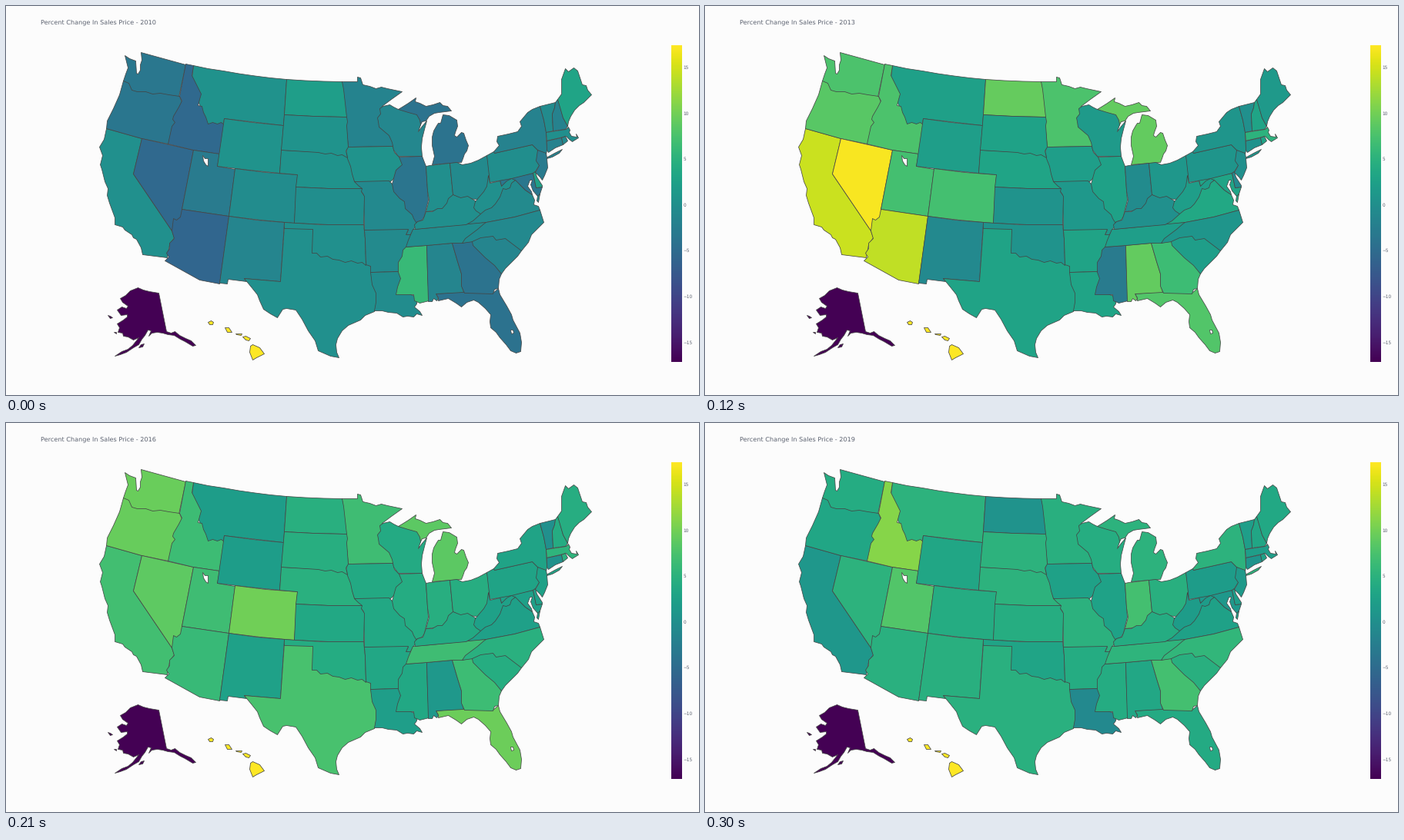
Recreate the animation shown at these times as a matplotlib script. Size 900 px wide and 506 px high, loop 330 ms.

```python
import numpy as np
import matplotlib.pyplot as plt
from matplotlib.animation import FuncAnimation

W, H, DPI = 900, 506, 64
LOW, HIGH = -17.2, 17.3
BAR_TOP, BAR_BOTTOM = 51.5, 463
KNOWN_YEARS = [2010, 2011, 2012, 2013, 2015, 2017, 2019]
PT = 72 / DPI  # points per pixel

plt.rcParams["font.family"] = "DejaVu Sans"
plt.rcParams["text.hinting"] = "none"
viridis = plt.get_cmap("viridis")

fig = plt.figure(figsize=(W / DPI, H / DPI), dpi=DPI, facecolor="#fcfcfc")
ax = fig.add_axes([0, 0, 1, 1])
ax.axis("off")

states = []


def shape(points, color):
    xy = np.reshape(points, (-1, 2))
    return ax.fill(xy[:, 0], xy[:, 1], facecolor=color, edgecolor="#444444",
                   linewidth=0.75 * PT, joinstyle="round")[0]


def state(name, rates, *outlines):
    """Later states cover the rough inner edges of earlier ones."""
    states.append((rates, [shape(o, "white") for o in outlines]))


# West
state("MT", [.3, -2.5, 1, 2.3, 1.2, 2.5, 5],
      [243, 77, 262, 81, 282, 84, 302, 87.5, 323, 90.5, 343, 93, 364, 95,
       360, 155, 283, 146, 281, 156, 262, 156, 240, 100])
state("CA", [0, -6, 0, 14.5, 6.5, 7.3, 1],
      [130, 159, 176, 172, 165, 218, 215, 292, 218, 301, 212, 310, 209, 327,
       177, 323, 175, 314, 169, 303, 165, 301, 163, 297, 154, 291, 151, 287,
       141, 284, 141, 275, 134, 256, 131, 246, 132, 237, 128, 228, 124, 212,
       122, 206, 125, 194, 121, 183, 127, 173])
state("WA", [-3.5, -9, -2.5, 7.5, 7.3, 11.5, 4],
      [154, 64, 160, 68, 168, 71, 169, 87, 171, 88, 174, 83, 174, 76, 176, 70,
       175, 60, 204, 68, 233, 76, 224, 118, 160, 120, 152, 97, 155, 88,
       158, 80, 156, 72])
state("OR", [-3.7, -9.5, -.3, 8.3, 8.5, 10, 3.2],
      [152, 97, 159, 100, 163, 109, 170, 111, 181, 111, 190, 114, 200, 113,
       211, 115, 225, 117, 231, 132, 224, 165, 210, 179, 176, 172, 130, 159,
       131, 149, 139, 133, 147, 115])
state("NV", [-5.5, -12, 0, 17, 8.5, 9, 5],
      [176, 172, 243, 187, 228, 264, 228, 275, 222, 281, 215, 292, 165, 218])
state("ID", [-5.5, -9, -.5, 7.5, 4.8, 8, 11],
      [233, 75, 243, 77, 241, 90, 244, 96, 248, 104, 253, 114, 251, 121,
       249, 129, 254, 130, 256, 138, 259, 144, 262, 153, 268, 151, 274, 153,
       279, 151, 283, 154, 277, 192, 243, 187, 210, 179, 215, 156, 219, 151,
       216, 147, 217, 143, 224, 131, 228, 123, 225, 117])
state("UT", [-3, -7, -1, 7, 5, 8.2, 8],
      [243, 187, 277, 192, 274, 208, 297, 212, 289, 273, 228, 264])
state("AZ", [-6, -11.5, 7, 14, 5, 7.2, 4.7],
      [228, 264, 289, 273, 277, 361, 251, 356, 206, 331, 208, 329, 211, 326,
       208, 321, 212, 315, 212, 308, 218, 302, 215, 292, 217, 276, 221, 278,
       226, 274])
state("WY", [.5, 0, 1, 2, 3.5, .3, 3.2],
      [283, 146, 320, 151, 360, 155, 355, 217, 315, 213, 274, 208])
state("CO", [-.5, -3, 2.5, 7, 11, 8.7, 4],
      [297, 211, 337, 216, 378, 219, 374, 282, 330, 278, 289, 273])
state("NM", [-1.5, -6, -4, -1, 1.5, 3.3, 4.5],
      [289, 273, 325, 278, 361, 281, 356, 358, 309, 354, 312, 358, 288, 355,
       287, 361, 277, 360])

# Middle
state("MN", [-1.8, -8.5, -.5, 7.5, 5, 8.3, 4.5],
      [436, 98, 456, 98, 456, 92, 460, 93, 463, 102, 472, 104, 480, 107,
       487, 105, 495, 107, 514, 111, 500, 121, 488, 130, 494, 145, 504, 170,
       502, 182, 444, 183, 440, 140])
state("ND", [2, 4, 2.5, 9.2, 7.5, 1.7, .5],
      [364, 95, 388, 96.5, 412, 97.5, 436, 98, 438, 108, 440, 126, 442, 144,
       400, 143, 361, 141])
state("IA", [.5, -1.5, .8, 2, 3.2, 4, 2.5],
      [443, 183, 502, 182, 504, 190, 512, 198, 516, 206, 505, 222, 499, 228,
       452, 228, 440, 195])
state("MO", [-1, -4, -1.5, 1.2, 2.7, 4.2, 4.8],
      [452, 228, 497, 227, 506, 236, 525, 262, 534, 282, 524, 298, 519, 297,
       522, 291, 465, 291, 464, 245])
state("NE", [.5, -1.5, .5, 3, 4, 5.3, 5],
      [357, 187, 442, 191, 443, 198, 447, 208, 449, 218, 452, 228, 457, 233,
       462, 237, 420, 237, 376, 235, 378, 219, 355, 217])
state("SD", [.5, 0, -1.5, 2.7, 5, 3.8, 5],
      [361, 141, 400, 143, 442, 144, 443, 150, 442, 155, 444, 183, 441, 188,
       443, 197, 436, 193, 430, 194, 422, 191, 414, 192, 405, 190, 357, 187])
state("KS", [-.3, -3.5, -1.5, .5, 1.5, 5.5, 4.2],
      [376, 235, 420, 237, 462, 237, 461, 241, 465, 247, 464, 284, 420, 284,
       374, 282])
state("TX", [0, -2.2, -.5, 2.8, 6, 8.5, 4.7],
      [361, 287, 398, 289, 410, 310, 460, 325, 473, 338, 480, 360, 484, 385,
       478, 397, 466, 402, 460, 408, 444, 415, 436, 422, 430, 432, 428, 440,
       429, 450, 432, 457, 421, 455, 405, 448, 401, 435, 392, 422, 384, 407,
       376, 395, 364, 393, 359, 394, 352, 405, 343, 400, 334, 394, 329, 383,
       326, 375, 318, 365, 309, 354, 356, 358])
state("OK", [0, -2, -1, .5, 2, 6, 3],
      [361, 281, 410, 284, 464, 284, 466, 303, 467, 337, 462, 333, 456, 334,
       448, 331, 440, 333, 432, 330, 424, 329, 417, 325, 408, 326, 403, 321,
       397, 321, 398, 290, 361, 289])
state("AR", [-.8, -2.5, 0, 2.8, 2.7, 4, 4],
      [465, 291, 522, 290, 519, 297, 525, 297, 526, 310, 520, 325, 512, 336,
       509, 345, 473, 346, 473, 338, 467, 336, 466, 303])
state("LA", [-.5, -2, -2, 3, 2.5, 1.5, -1],
      [473, 346, 509, 345, 516, 356, 512, 370, 533, 378, 533, 387, 530, 391,
       537, 397, 540, 402, 533, 400, 529, 404, 521, 403, 515, 404, 507, 399,
       496, 398, 488, 396, 478, 396, 480, 385, 480, 373, 475, 362])

# Great Lakes
state("MI", [-4, -7, .5, 9, 8.7, 8.5, 5],
      [509, 134, 514, 131, 522, 126, 532, 119, 531, 124, 537, 126, 545, 130,
       554, 128, 563, 125, 567, 129, 573, 130, 578, 136, 570, 137, 562, 138,
       556, 139, 549, 143, 545, 149, 540, 150, 537, 156, 530, 146, 520, 140],
      [553, 206, 556, 195, 553, 181, 553, 170, 555, 162, 559, 155, 561, 152,
       564, 152, 567, 141, 575, 142, 585, 148, 586, 156, 583, 164, 582, 168,
       585, 170, 591, 164, 594, 165, 597, 174, 600, 181, 598, 188, 595, 192,
       593, 198, 591, 203, 576, 204])
state("WI", [-1.2, -4.8, -.8, 1.5, 1.5, 6, 4.2],
      [489, 130, 498, 128, 503, 131, 509, 134, 522, 138, 533, 141, 537, 148,
       538, 154, 535, 163, 540, 156, 546, 149, 543, 160, 540, 172, 539, 183,
       540, 195, 509, 195, 503, 187, 501, 177, 497, 168, 484, 157, 483, 150,
       482, 145, 486, 140, 485, 133])
state("IL", [-3.8, -10, -5.5, 2.5, 4, 4, 2.7],
      [510, 196, 540, 195, 543, 203, 545, 208, 547, 240, 548, 252, 545, 264,
       543, 273, 540, 278, 532, 281, 529, 276, 527, 271, 518, 263, 517, 254,
       511, 250, 503, 241, 501, 231, 504, 220, 506, 213, 514, 206])
state("IN", [-.2, -1.7, -.5, -.7, 3, 5.8, 7],
      [545, 208, 550, 207, 576, 204, 580, 245, 576, 256, 566, 265, 545, 267,
       549, 252, 547, 240])
state("OH", [-.8, -4.5, -.8, 1, 2.8, 5.8, 4.5],
      [576, 204, 585, 203, 592, 206, 603, 204, 613, 200, 624, 194, 628, 214,
       626, 235, 614, 251, 590, 250, 580, 245])

# South
state("FL", [-4.2, -9, .5, 8, 8.5, 10.5, 3.8],
      [558, 374, 594, 371, 632, 373, 639, 367, 641, 375, 650, 390, 656, 401,
       658, 408, 667, 425, 669, 437, 668, 449, 662, 451, 655, 448, 649, 440,
       641, 431, 636, 424, 629, 418, 628, 410, 629, 401, 622, 393, 613, 385,
       607, 382, 598, 385, 591, 391, 584, 386, 574, 380, 561, 383, 561, 379])
state("MS", [6, -4.5, -5.5, -3, 3.2, 3.8, 4],
      [519, 313, 546, 311, 547, 350, 549, 383, 537, 386, 530, 383, 529, 375,
       506, 375, 508, 365, 512, 354, 509, 346, 509, 333, 514, 325, 515, 317])
state("AL", [-1.5, -4, .2, 9, 1, 1.5, 3.3],
      [546, 311, 579, 308, 586, 332, 591, 348, 591, 362, 594, 372, 558, 374,
       561, 380, 559, 383, 555, 380, 553, 384, 548, 384, 547, 350])
state("GA", [-4, -11, -7, 6.5, 6, 6.8, 7],
      [579, 308, 607, 305, 630, 325, 643, 348, 640, 355, 639, 367, 634, 368,
       632, 374, 595, 373, 591, 364, 591, 348, 586, 332])
state("VA", [-.8, -4, -.7, 3.5, 1, 3.5, 2.5],
      [590, 285, 605, 275, 612, 262, 630, 245, 645, 232, 661, 225, 668, 233,
       674, 239, 683, 245, 686, 252, 685, 258, 691, 260, 693, 265, 660, 274,
       623, 281],
      [693, 244, 691, 255, 689, 253, 690, 246])
state("TN", [-.6, -3, -1, 2, 5, 8.3, 5.2],
      [528, 290, 552, 288, 590, 284, 623, 281, 623, 290, 605, 304, 592, 308,
       579, 308, 546, 311, 519, 313, 522, 304])
state("NC", [-1, -4.5, -1, .8, 3, 6.5, 5.5],
      [623, 281, 660, 274, 693, 265, 698, 281, 688, 291, 682, 297, 678, 307,
       669, 318, 640, 315, 606, 306, 592, 308, 596, 302, 604, 296, 612, 290,
       620, 283])
state("SC", [-1.5, -5, -1, 2, 1.7, 6.5, 4.5],
      [605, 306, 616, 301, 632, 299, 636, 304, 648, 302, 669, 318, 664, 325,
       656, 333, 648, 341, 643, 348, 634, 337, 622, 327, 612, 317, 606, 311])
state("KY", [-.2, -3, -1, 0, 2.3, 5, 4],
      [531, 290, 530, 284, 534, 280, 541, 278, 545, 267, 553, 267, 560, 263,
       566, 263, 572, 256, 574, 250, 580, 245, 590, 249, 599, 247, 609, 253,
       612, 262, 616, 270, 606, 279, 597, 284, 552, 288])

# Northeast
state("MD", [-3.5, -7, -1.5, 3, 1.5, 3, 1.2],
      [641, 226, 684, 217, 688, 236, 696, 235, 693, 244, 690, 247, 684, 240,
       681, 232, 683, 226, 680, 226, 677, 234, 682, 241, 683, 245, 674, 239,
       668, 233, 661, 226, 650, 230, 643, 234])
state("WV", [0, -.3, -.3, 2, 3, 1.7, 1.7],
      [626, 220, 628, 230, 641, 227, 643, 234, 650, 227, 656, 224, 661, 226,
       656, 230, 654, 236, 649, 238, 645, 237, 641, 248, 635, 257, 630, 262,
       622, 265, 616, 270, 610, 266, 607, 262, 609, 254, 614, 248, 620, 241,
       624, 234])
state("PA", [-.3, -4, -2.5, .8, 1.5, 4, 1.8],
      [624, 194, 633, 189, 634, 191, 683, 180, 690, 187, 692, 207, 687, 215,
       684, 217, 656, 224, 628, 229])
state("DE", [2.5, 0, -17, -1, 1.5, 3, 2],
      [684, 217, 687, 215, 689, 222, 696, 233, 696, 235, 688, 236])
state("NY", [-2, -5, -3.5, .8, 1.5, 4, 5],
      [633, 189, 640, 181, 637, 176, 638, 169, 652, 166, 664, 163, 669, 156,
       667, 150, 677, 138, 683, 134, 693, 130, 698, 148, 701, 164, 702, 187,
       701, 193, 690, 187, 683, 180, 634, 191],
      [703, 196, 712, 191, 722, 186, 718, 191, 709, 196, 702, 198])
state("NJ", [-3, -7, -5, 0, 0, 5, 1.5],
      [690, 187, 701, 191, 702, 197, 703, 210, 699, 220, 696, 226, 693, 222,
       687, 216, 692, 207, 688, 201])
state("VT", [-.7, -.8, -.5, 0, -1, 1, 2],
      [693, 130, 713, 125, 712, 132, 709, 140, 710, 162, 701, 164, 698, 148])
state("NH", [-2, -5.5, -.5, 3, 2.5, 5.5, 3.2],
      [713, 125, 716, 121, 719, 130, 723, 145, 729, 156, 726, 160, 710, 162,
       709, 140, 712, 132])
state("ME", [3, -3.5, 1.3, 1.3, 2, 6.5, 3.5],
      [716, 121, 721, 114, 721, 95, 726, 81, 730, 85, 737, 80, 742, 84,
       748, 102, 753, 103, 755, 109, 760, 115, 750, 125, 744, 129, 738, 135,
       733, 143, 730, 150, 729, 156, 723, 145])
state("MA", [-.2, -3.5, -.5, 5, 3.5, 7, 2],
      [701, 164, 727, 160, 730, 157, 732, 161, 731, 164, 734, 169, 741, 170,
       740, 166, 743, 171, 735, 176, 731, 173, 727, 169, 702, 175])
state("CT", [-2, -6, -5, .3, -.7, 1, .7],
      [702, 175, 721, 171, 723, 180, 713, 184, 704, 190, 702, 187])
state("RI", [-1, -5, -4, 3, 2.5, 7, 2.5],
      [721, 171, 726, 169, 729, 175, 723, 180])

# Detached states
state("AK", [-17.2] * 7,
      [171, 366, 178, 369, 186, 371, 192, 372, 198, 373, 208, 423, 214, 425,
       219, 423, 225, 428, 233, 432, 240, 435, 246, 441, 242, 442, 232, 436,
       226, 433, 218, 428, 210, 427, 203, 425, 196, 424, 189, 425, 185, 429,
       188, 422, 184, 421, 180, 428, 176, 433, 172, 440, 165, 444, 156, 450,
       148, 453, 141, 455, 150, 449, 158, 446, 164, 441, 168, 436, 172, 431,
       165, 434, 158, 430, 152, 429, 151, 425, 145, 424, 147, 418, 144, 413,
       152, 408, 157, 404, 157, 401, 149, 402, 144, 395, 150, 391, 156, 393,
       158, 390, 151, 385, 148, 380, 155, 376, 161, 370],
      [172, 444, 175, 440, 179, 439, 177, 443],
      [132, 402, 135, 403, 138, 405, 135, 406],
      [139, 423, 142, 423, 142, 425])
state("HI", [17.3] * 7,
      [262, 411, 266, 409, 269, 411, 268, 414, 264, 414],
      [284, 418, 289, 418, 293, 424, 287, 424],
      [298, 426, 306, 426, 305, 428, 299, 427],
      [307, 430, 311, 429, 317, 432, 315, 435, 311, 434],
      [317, 442, 320, 440, 329, 444, 335, 452, 325, 457, 320, 460, 316, 450])

# Lakes
shape([255, 194, 258, 198, 262, 198, 262, 208, 259, 206, 256, 201], "white")
shape([655, 421, 658, 421, 659, 425, 656, 426], "white")

# Colour scale
ax.imshow(np.linspace(1, 0, 256)[:, None], cmap=viridis, aspect="auto",
          extent=(863.5, 877.5, BAR_BOTTOM, BAR_TOP), interpolation="bilinear")
for tick in range(-15, 16, 5):
    label = str(tick).replace("-", "\u2212")
    ax.text(878.8, 258.3 - 11.92 * tick + 2, label, size=5.7 * PT,
            color="#5c6270", va="baseline")

title = ax.text(44.3, 23.2, "", size=8.1 * PT, color="#5c6270", va="baseline")
ax.set_xlim(-.5, W - .5)
ax.set_ylim(H - .5, -.5)


def draw(frame):
    year = 2010 + max(frame - 1, 0)  # the first year is held twice as long
    title.set_text(f"Percent Change In Sales Price - {year}")
    for rates, patches in states:
        rate = np.interp(year, KNOWN_YEARS, rates)
        color = viridis((rate - LOW) / (HIGH - LOW))
        for patch in patches:
            patch.set_facecolor(color)
    return []


anim = FuncAnimation(fig, draw, frames=11, interval=30, repeat=True,
                     repeat_delay=0)
plt.show()
```
